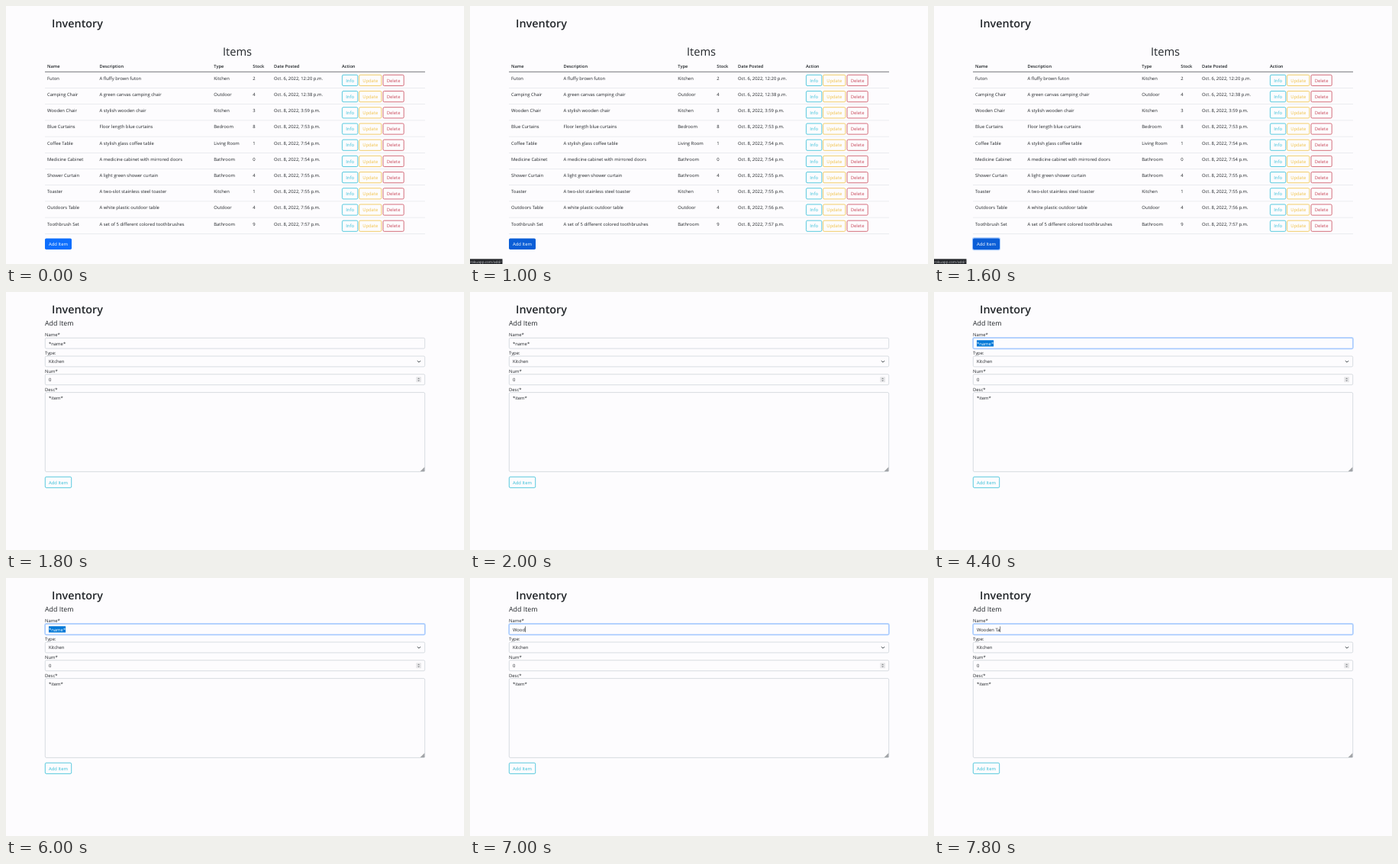
Animation of 600 by 338 pixels, one loop 8 s. Source, as an HTML page with a canvas:

```html
<!DOCTYPE html>
<html lang="en">
<head>
<meta charset="utf-8">
<title>Inventory</title>
<style>
  html, body { margin: 0; width: 100%; height: 100%; overflow: hidden; background: #fdfcfe; }
  canvas { display: block; width: 600px; height: 338px; }
</style>
</head>
<body>
<canvas id="stage"></canvas>
<script>
const W = 600, H = 338, LOOP = 8000;
const canvas = document.getElementById('stage');
const ctx = canvas.getContext('2d');
const ratio = window.devicePixelRatio || 1;
canvas.width = W * ratio;
canvas.height = H * ratio;

const FAMILY = '"Open Sans", "Noto Sans", sans-serif';
const BODY = 5.88;
const PAGE = '#fdfcfe', INK = '#212529', LINE = '#ced4da', RULE = '#dee2e6';
const CYAN = '#2fbdd6', AMBER = '#f0c145', RED = '#c9495a';

const columns = [54, 122.5, 272.3, 323.3, 351, 440];
const heads = ['Name', 'Description', 'Type', 'Stock', 'Date Posted', 'Action'];
const items = [
  ['Futon', 'A fluffy brown futon', 'Kitchen', '2', 'Oct. 6, 2022, 12:20 p.m.'],
  ['Camping Chair', 'A green canvas camping chair', 'Outdoor', '4', 'Oct. 6, 2022, 12:38 p.m.'],
  ['Wooden Chair', 'A stylish wooden chair', 'Kitchen', '3', 'Oct. 8, 2022, 3:59 p.m.'],
  ['Blue Curtains', 'Floor length blue curtains', 'Bedroom', '8', 'Oct. 8, 2022, 7:53 p.m.'],
  ['Coffee Table', 'A stylish glass coffee table', 'Living Room', '1', 'Oct. 8, 2022, 7:54 p.m.'],
  ['Medicine Cabinet', 'A medicine cabinet with mirrored doors', 'Bathroom', '0', 'Oct. 8, 2022, 7:54 p.m.'],
  ['Shower Curtain', 'A light green shower curtain', 'Bathroom', '4', 'Oct. 8, 2022, 7:55 p.m.'],
  ['Toaster', 'A two-slot stainless steel toaster', 'Kitchen', '1', 'Oct. 8, 2022, 7:55 p.m.'],
  ['Outdoors Table', 'A white plastic outdoor table', 'Outdoor', '4', 'Oct. 8, 2022, 7:56 p.m.'],
  ['Toothbrush Set', 'A set of 5 different colored toothbrushes', 'Bathroom', '9', 'Oct. 8, 2022, 7:57 p.m.']
];

// Name field over time: [start, text, mode]
const typing = [
  [1800, '*name*', 'idle'],
  [3000, '*name*', 'caret'],
  [3200, '*name*', 'selected'],
  [6800, 'W', 'caret'],
  [7000, 'Wood', 'caret'],
  [7200, 'Wooden ', 'caret'],
  [7600, 'Wooden ', 'focus'],
  [7800, 'Wooden Ta', 'caret']
];

function text(str, x, y, size = BODY, color = INK, weight = 400, align = 'left') {
  ctx.font = `${weight} ${size}px ${FAMILY}`;
  ctx.fillStyle = color;
  ctx.textAlign = align;
  ctx.fillText(str, x, y);
}

function rect(x, y, w, h, color) {
  ctx.fillStyle = color;
  ctx.fillRect(x, y, w, h);
}

function box(x, y, w, h, r, fill, stroke, width = 0.8) {
  ctx.beginPath();
  ctx.roundRect(x, y, w, h, r);
  if (fill) {
    ctx.fillStyle = fill;
    ctx.fill();
  }
  if (stroke) {
    ctx.strokeStyle = stroke;
    ctx.lineWidth = width;
    ctx.stroke();
  }
}

function path(points, color, width) {
  ctx.beginPath();
  points.forEach(([x, y]) => ctx.lineTo(x, y));
  if (width) {
    ctx.strokeStyle = color;
    ctx.lineWidth = width;
    ctx.stroke();
  } else {
    ctx.fillStyle = color;
    ctx.fill();
  }
}

function outlineButton(label, x, y, w, color) {
  box(x, y, w, 14.2, 1.6, null, color);
  text(label, x + w / 2, y + 9.3, BODY, color, 400, 'center');
}

function drawTable(t) {
  text('Items', 303, 65.2, 14.7, INK, 400, 'center');
  heads.forEach((head, i) => text(head, columns[i], 81.1, 5.7, INK, 600));
  rect(51, 85.8, 498, 0.8, '#50545a');

  items.forEach((item, i) => {
    const y = 86.3 + i * 21.2;
    item.forEach((cell, c) => text(cell, columns[c], y + 10.4));
    outlineButton('Info', 440.4, y + 4, 20.4, CYAN);
    outlineButton('Update', 462.6, y + 4, 29.2, AMBER);
    outlineButton('Delete', 494, y + 4, 27.2, RED);
    rect(51, y + 20.9, 498, 0.6, RULE);
  });

  const hover = t >= 800;
  if (t >= 1400) box(50, 303.3, 37, 16.9, 2.4, '#9ec5fe');
  box(51, 304.4, 35, 14.6, 1.7, hover ? '#0b5ed7' : '#0d6efd');
  text('Add Item', 68.5, 314.1, BODY, '#fff', 400, 'center');

  if (t >= 1000) {
    rect(0, 331.4, 42.5, 6.6, '#24262a');
    text('erokuapp.com/add/', 41, 336.6, 4.7, '#c4c7cb', 400, 'right');
  }
}

function drawNameField(t) {
  const [, value, mode] = typing.findLast(step => t >= step[0]);
  const idle = mode === 'idle';
  if (!idle) box(50.2, 59.1, 499.6, 16.1, 2.4, '#c2dbfe');
  box(51.3, 60.2, 497.4, 13.9, 1.6, PAGE, idle ? LINE : '#86b7fe');

  ctx.font = `400 ${BODY}px ${FAMILY}`;
  const width = ctx.measureText(value).width;
  const selected = mode === 'selected';
  if (selected) rect(56, 63.2, width, 8.2, '#0078d7');
  text(value, 56, 69.6, BODY, selected ? '#fff' : INK);
  if (mode === 'caret') rect(56 + width, 63.4, 0.6, 7.6, INK);
}

function drawForm(t) {
  text('Add Item', 51, 44.4, 8.85);
  [['Name*', 58], ['Type:', 81.7], ['Num*', 105.6], ['Desc*', 129.5]]
    .forEach(([label, y]) => text(label, 51, y));

  drawNameField(t);

  box(51.3, 84, 497.4, 13.9, 1.6, null, LINE);
  text('Kitchen', 56, 93.4);
  path([[538.9, 90], [541, 92.1], [543.1, 90]], '#343a40', 0.9);

  box(51.3, 107.8, 497.4, 13.9, 1.6, null, LINE);
  text('0', 56, 117.2);
  rect(537.3, 111.2, 6.6, 7, '#e6e6e8');
  path([[539.2, 114], [540.6, 112.4], [542, 114]], '#808488');
  path([[539.2, 115.5], [540.6, 117.1], [542, 115.5]], '#808488');

  box(51.3, 131.6, 497.4, 103.8, 1.6, null, LINE);
  text('*item*', 56, 141.2);
  path([[548.4, 229.2], [548.4, 235], [542.6, 235]], '#a2a4a8');

  outlineButton('Add Item', 51.3, 242.2, 34.4, CYAN);
}

function draw(now) {
  const t = now % LOOP;
  ctx.setTransform(ratio, 0, 0, ratio, 0, 0);
  ctx.textRendering = 'geometricPrecision';
  rect(0, 0, W, H, PAGE);
  text('Inventory', 60, 27.9, 14.4, INK, 600);
  if (t < 1800) drawTable(t);
  else drawForm(t);
}

const start = performance.now();
function tick() {
  draw(performance.now() - start);
  requestAnimationFrame(tick);
}
tick();
</script>
</body>
</html>
```
